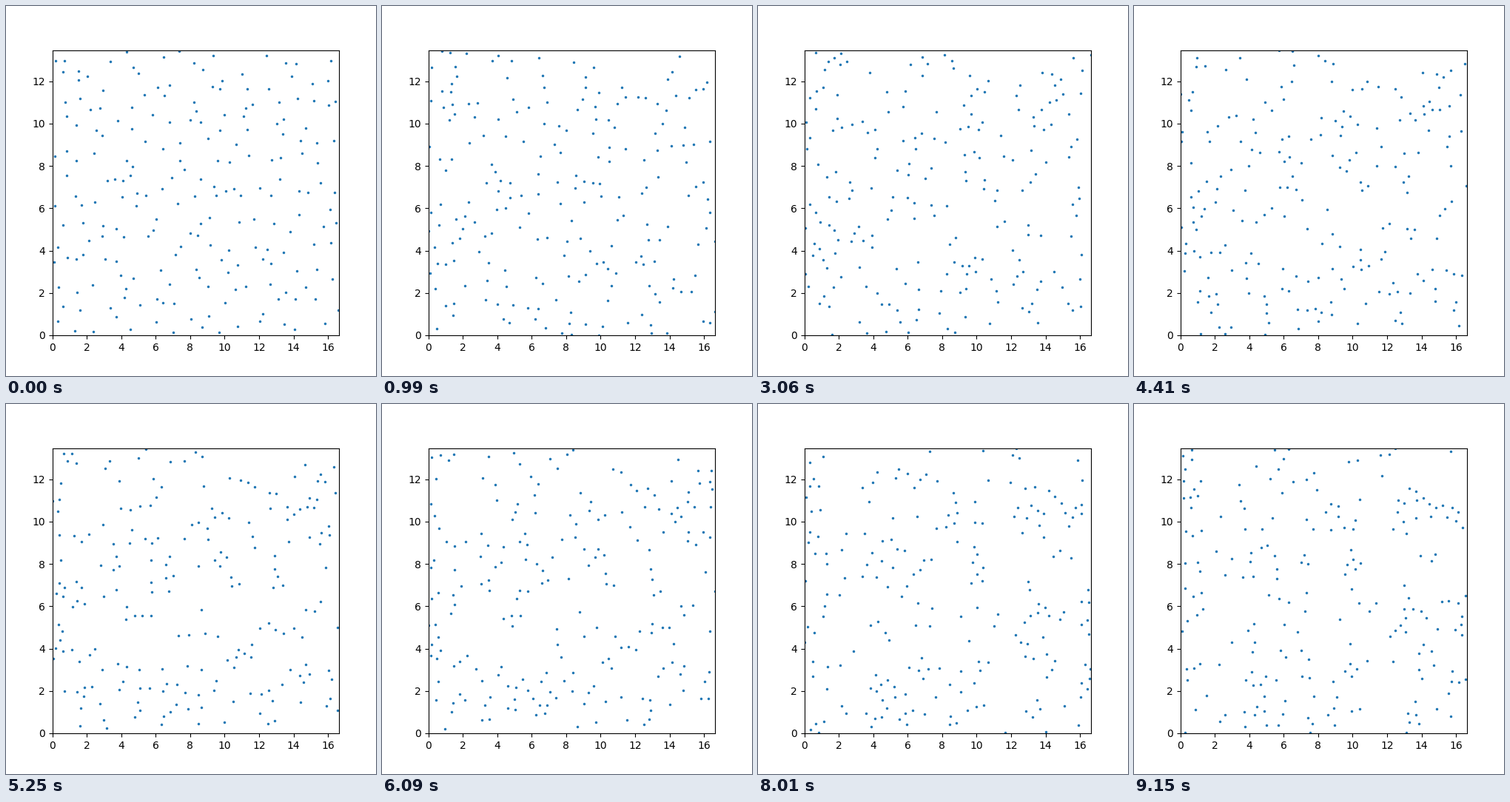
Write a matplotlib script that moves like this. It is 500x500 px and loops after 9180 ms.

```python
import numpy as np
import matplotlib.pyplot as plt
from matplotlib.animation import FuncAnimation

COLS, ROWS, SPACING = 15, 14, 1.10935
BOX = np.array([COLS, ROWS * np.sqrt(3) / 2]) * SPACING
COUNT = COLS * ROWS
FRAMES, INTERVAL, SUBSTEPS = 306, 30, 3
WARMUP = 28       # frames from the ordered lattice to the first picture

SIGMA = 0.38      # core size
SPEED = 0.012     # thermal speed per axis and frame
EPSILON = 2.0 * SPEED ** 2
CUTOFF = 2.5 * SIGMA

rng = np.random.default_rng(7)


def nearest(delta):
    """Shortest displacement in the periodic box."""
    return delta - BOX * np.round(delta / BOX)


def lattice():
    """Triangular lattice that fills the box."""
    row, col = np.divmod(np.arange(COUNT), COLS)
    x = col + 0.25 + 0.5 * (row % 2)
    y = (row + 0.5) * np.sqrt(3) / 2
    return np.column_stack([x, y]) * SPACING


def forces(pos):
    """Lennard-Jones forces between all pairs."""
    delta = nearest(pos[:, None] - pos[None])
    r2 = np.einsum("ijk,ijk->ij", delta, delta)
    i, j = np.nonzero((r2 < CUTOFF ** 2) & (r2 > 0))
    near = np.maximum(r2[i, j], (0.75 * SIGMA) ** 2)
    s6 = (SIGMA ** 2 / near) ** 3
    pull = (24 * EPSILON * (2 * s6 ** 2 - s6) / near)[:, None] * delta[i, j]
    return np.column_stack([np.bincount(i, pull[:, k], COUNT) for k in (0, 1)])


def simulate():
    pos = lattice()
    vel = rng.normal(0, SPEED, (COUNT, 2))
    vel -= vel.mean(axis=0)
    acc = forces(pos)
    dt = 1 / SUBSTEPS
    path = [pos]
    for _ in range(WARMUP + FRAMES - 1):
        for _ in range(SUBSTEPS):
            vel = vel + acc * dt / 2
            pos = (pos + vel * dt) % BOX
            acc = forces(pos)
            vel = vel + acc * dt / 2
        # gentle thermostat
        vel *= 1 + 0.1 * (SPEED / vel.std() - 1)
        path.append(pos)
    return path[WARMUP:]


path = simulate()

fig, ax = plt.subplots(figsize=(5, 5), dpi=100)
ax.set_xlim(0, BOX[0])
ax.set_ylim(0, BOX[1])
dots, = ax.plot([], [], ".", color="C0", markersize=3)


def update(frame):
    dots.set_data(*path[frame].T)
    return dots,


anim = FuncAnimation(fig, update, frames=FRAMES, interval=INTERVAL,
                     repeat=True, repeat_delay=0)
plt.show()
```
